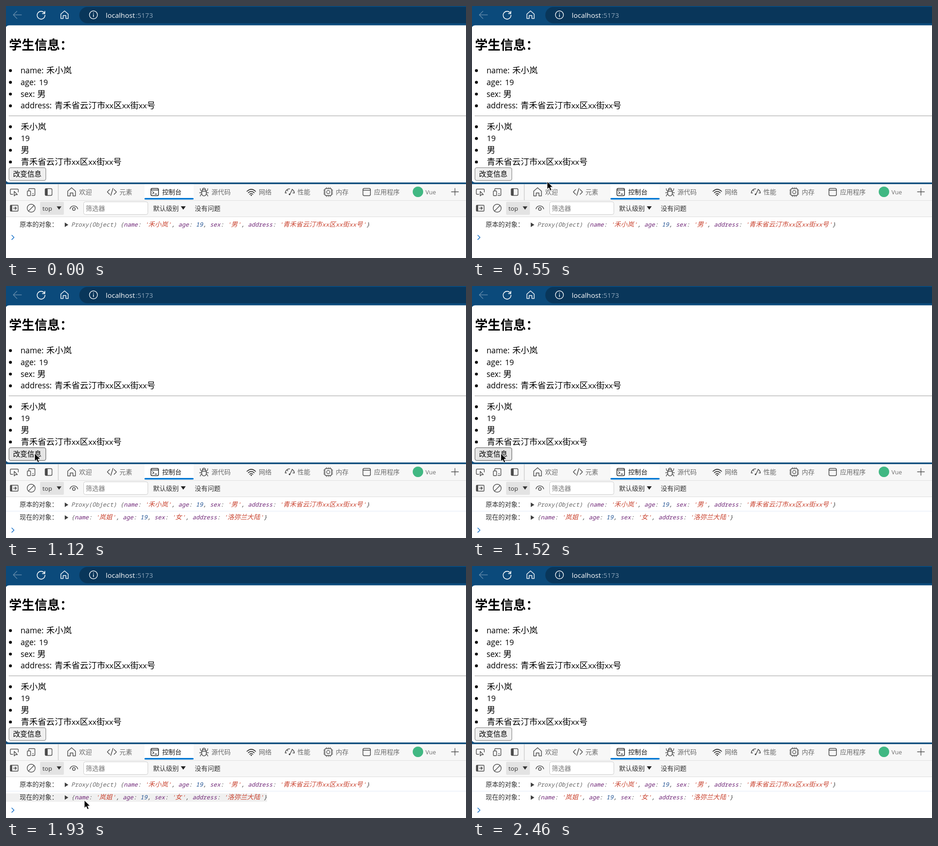
Recreate the animation shown at these times as an HTML page. Size 1010 px wide and 554 px high, loop 2.49 s.

```html
<!DOCTYPE html>
<html lang="zh-CN">
<head>
<meta charset="utf-8">
<title>学生信息</title>
<style>
html, body { margin: 0; width: 100%; height: 100%; overflow: hidden; background: #fff; }
svg { display: block; width: 100%; height: 100%; }
text { white-space: pre; font-family: "Open Sans", "Noto Sans CJK SC", "Noto Sans CJK", sans-serif; }
.mono { font-family: "Noto Sans Mono", "Noto Sans CJK SC", "Noto Sans CJK", monospace; font-style: italic; }
.wide { font-weight: 350; }
.bold, .bold .wide { font-weight: 700; }
</style>
</head>
<body>
<svg id="stage" viewBox="0 0 1010 554"></svg>
<script>
const LOOP = 2490;
const stage = document.getElementById('stage');
const person = ['禾小岚', '19', '男', '青禾省云汀市xx区xx街xx号'];
const changed = ['岚姐', '19', '女', '洛弥兰大陆'];
const keys = ['name', 'age', 'sex', 'address'];

function add(tag, attrs, parent = stage) {
  const el = document.createElementNS('http://www.w3.org/2000/svg', tag);
  for (const k in attrs) el.setAttribute(k, attrs[k]);
  return parent.appendChild(el);
}
const group = () => add('g', {});
const rect = (x, y, width, height, fill, more = {}, parent) =>
  add('rect', { x, y, width, height, fill, ...more }, parent);
const circle = (cx, cy, r, fill, more = {}) => add('circle', { cx, cy, r, fill, ...more });
const shape = (d, fill, parent) => add('path', { d, fill }, parent);
const line = (d, stroke, width = 1.4, parent) => add('path', {
  d, stroke, fill: 'none', 'stroke-width': width, 'stroke-linecap': 'round', 'stroke-linejoin': 'round'
}, parent);

// Latin runs are set a little smaller than the Chinese ones.
function addRuns(el, str, size, latin, fill) {
  for (const run of str.match(/[\u2e80-\uffef]+|[^\u2e80-\uffef]+/g)) {
    const wide = run.charCodeAt(0) >= 0x2e80;
    const span = add('tspan', { 'font-size': wide ? size : latin, fill }, el);
    if (wide) span.setAttribute('class', 'wide');
    span.textContent = run;
  }
}
function text(x, y, str, size, fill, more = {}, parent = stage) {
  addRuns(add('text', { x, y, ...more }, parent), str, size, size * 0.925, fill);
}

function drawBrowser() {
  rect(0, 0, 1010, 392, '#0b4a7b');
  rect(161, 2, 880, 36, '#09365a', { rx: 18 });
  line('M34 19.5H16M24 11.5L16 19.5L24 27.5', '#6088a8', 1.5);
  line('M84.5 16A8.6 8.6 0 1 0 85.6 20M85.3 11.5V16.6H80', '#fff', 1.6);
  line('M120.5 17.8L128.5 10.8L136.5 17.8V27.5H131.5V21H125.5V27.5H120.5Z', '#fff', 1.5);
  circle(192, 19.5, 8.8, 'none', { stroke: '#fff', 'stroke-width': 1.4 });
  line('M192 18.7V23.7', '#fff', 1.5);
  circle(192, 15.5, 1, '#fff');
  text(219, 25.5, 'localhost', 16.6, '#fff');
  text(284.5, 25.5, ':5173', 16.2, '#8ba3b8');
  rect(-1, 42.5, 1030, 345.5, '#fff', { rx: 8 });
}

function drawPage() {
  text(6.5, 96, '学生信息：', 28, '#000', { class: 'bold' });
  const valueX = [88.5, 72.5, 68.5, 106.5];
  person.forEach((value, i) => {
    const top = 148 + i * 25.8, low = 271.5 + i * 25.8;
    for (const y of [top, low]) circle(9.7, y - 6, 3.2, '#000');
    text(32, top, keys[i] + ':', 18.7, '#000');
    text(valueX[i], top, value, 18.6, '#000');
    text(32.5, low, value, 18.6, '#000');
  });
  rect(6, 241, 1004, 1, '#999');
  const button = rect(6.5, 355.5, 81, 28, '#efefef', { rx: 3.5, stroke: '#767676' });
  text(15.5, 375, '改变信息', 15.6, '#000');
  return button;
}

function drawTabs() {
  const ink = '#4a4a4a', dim = '#6c6c6c';
  rect(0, 391.5, 1010, 72.5, '#f7f7f7');
  rect(0, 427, 1010, 1, '#dedede');
  rect(0, 463, 1010, 1, '#dcdcdc');
  rect(114, 392, 1.3, 35, '#c8c8c8');
  rect(304, 392, 108, 33, '#fff');
  rect(304, 422, 108, 3.6, '#0078d4', { rx: 1.8 });

  // inspect, device and dock
  line('M15 414H11Q9.5 414 9.5 412.5V404Q9.5 402.5 11 402.5H25.5Q27 402.5 27 404V409', ink);
  line('M18 407.5V417.5L20.8 414.8H25Z', ink);
  line('M50 406V403Q50 401.5 51.5 401.5H62Q63.5 401.5 63.5 403V415Q63.5 416.5 62 416.5H57M58.5 412.5H60', ink);
  rect(46.8, 406.5, 7.2, 10.5, '#f7f7f7', { rx: 1.5, stroke: ink, 'stroke-width': 1.4 });
  rect(86, 401.5, 15, 15, 'none', { rx: 2.5, stroke: ink, 'stroke-width': 1.4 });
  rect(86, 401.5, 5.5, 15, ink, { rx: 1.5 });

  line('M135.5 407L144 399.5L152.5 407V417.5H147V411H141V417.5H135.5Z', ink, 1.5);
  line('M227.5 403.5L222.5 408.8L227.5 414M237.5 403.5L242.5 408.8L237.5 414M235 401L230 416.5', ink, 1.5);
  rect(318.3, 401, 16.5, 16, 'none', { rx: 2.5, stroke: '#222', 'stroke-width': 1.5 });
  line('M318.5 404.5H334.5M321.8 408L324.8 410.5L321.8 413M327 413.5H331', '#222', 1.3);

  // bug
  rect(429.7, 403.5, 10, 14, 'none', { rx: 5, stroke: ink, 'stroke-width': 1.5 });
  line('M431 405Q431 400.5 434.7 400.5T438.4 405M430 407.5H439.5M429.5 410.5H425M440 410.5H444.5M430 407Q426.5 406.5 426.5 401.5M439.5 407Q443 406.5 443 401.5M430 414Q426.5 414.5 426.5 418M439.5 414Q443 414.5 443 418', ink, 1.3);
  // wifi
  line('M529 407.5Q538.5 398.5 548 407.5M532 410.7Q538.5 404.5 545 410.7M535 413.8Q538.5 410.5 542 413.8', '#333', 1.7);
  circle(538.5, 416, 1.5, '#333');
  // gauge
  line('M613 411Q614.5 402 623 402M628 403Q632.5 405.5 633.3 411M613 411H616M617 404L618.8 406.5M623 415L628.5 403M630 411H633.3', ink, 1.5);
  circle(622.5, 414, 1.8, ink);
  // chip
  rect(700, 401.5, 15, 15, 'none', { rx: 2.5, stroke: ink, 'stroke-width': 1.4 });
  circle(707.5, 409, 3.6, 'none', { stroke: ink, 'stroke-width': 1.3 });
  for (const d of [-4, 0, 4]) {
    line(`M${707.5 + d} 399V401M${707.5 + d} 417V419M697.5 ${409 + d}H699.5M715.5 ${409 + d}H717.5`, ink, 1.3);
  }
  rect(783.7, 401, 16.5, 16, 'none', { rx: 3, stroke: ink, 'stroke-width': 1.5 });
  line('M784 405H800', ink, 1.5);
  circle(904.5, 408.5, 11.5, '#41b883');
  line('M978 408.5H993.5M985.7 400.8V416.2', ink, 1.3);

  const tabs = [[160.5, '欢迎'], [249, '元素'], [451, '源代码'], [555, '网络'], [640, '性能'],
    [724, '内存'], [808, '应用程序'], [921, 'Vue']];
  for (const [x, label] of tabs) text(x, 414, label, 14.1, dim);
  text(343, 414, '控制台', 14.1, '#1b1b1b');
}

function drawToolbar() {
  const ink = '#4a4a4a';
  rect(9.5, 438, 17, 13, 'none', { rx: 1.5, stroke: ink, 'stroke-width': 1.5 });
  rect(9.5, 438, 4, 13, ink);
  line('M16.5 444.5H22M20 441.7L22.8 444.5L20 447.3', ink, 1.6);
  circle(55.3, 444.5, 8.8, 'none', { stroke: ink, 'stroke-width': 1.4 });
  line('M49.3 450.7L61.5 438.5', ink);
  rect(75, 430.5, 52, 28.5, '#e3e3e3', { rx: 2 });
  text(80, 450, 'top', 14.6, '#333');
  shape('M111.3 440.5H121.7L116.5 447.8Z', '#333');
  const eyeBack = rect(133, 430.5, 32, 28.5, '#e9e9e9', { rx: 2 });
  line('M140.5 446Q142.5 439.5 149 439.5T157.5 446', ink, 1.5);
  circle(149, 446.3, 3, 'none', { stroke: ink, 'stroke-width': 1.5 });
  rect(170.5, 430.5, 141, 28, '#fff', { rx: 4, stroke: '#cacaca' });
  text(175, 450, '筛选器', 14.1, '#757575');
  text(323, 450, '默认级别', 14.1, '#333');
  shape('M383.8 440.3H394.6L389.2 447.8Z', '#222');
  text(414.5, 450, '没有问题', 14.1, '#333');
  return eyeBack;
}

function drawRow(y, label, type, values) {
  const g = group();
  const back = rect(0, y - 13, 0, 18.5, '#f0f0f0', {}, g);
  text(30, y, label, 14, '#303030', {}, g);
  shape(`M129 ${y - 9}L136.8 ${y - 4}L129 ${y + 1}Z`, '#404040', g);
  const el = add('text', { x: 143, y, class: 'mono' }, g);
  const put = (str, fill) => addRuns(el, str, 14.3, 12.83, fill);
  put(type + '{', '#666');
  values.forEach((value, i) => {
    if (i) put(', ', '#444');
    put(keys[i], '#702878');
    put(': ', '#555');
    if (i === 1) put(value, '#1d4f91');
    else put(`'${value}'`, '#c9432f');
  });
  put('}', '#444');
  // the highlight ends with the text
  const right = 143 + el.getComputedTextLength();
  back.setAttribute('width', right);
  return { g, back, y, right };
}

drawBrowser();
const button = drawPage();
drawTabs();
const eyeBack = drawToolbar();
rect(0, 464, 1010, 90, '#fff');
const rows = [
  drawRow(485, '原本的对象：', 'Proxy(Object) ', person),
  drawRow(513, '现在的对象：', '', changed)
];
rect(0, 494.5, 1010, 1, '#dfe9f8', {}, rows[1].g);
const prompt = line('M12.8 504L17.6 508.7L12.8 513.4', '#1a73c9', 1.6);
const cursor = add('path', {
  d: 'M0 0V17.3L4 13.6L6.8 20L9.9 18.7L7.1 12.4H12.6Z',
  fill: '#000', stroke: '#fff', 'stroke-width': 1
});

// time, x, y of the pointer tip
const path = [
  [170, 560, 553], [290, 433, 457], [420, 295, 412], [550, 166, 386], [620, 95, 373], [670, 65, 369],
  [730, 65, 369], [760, 63, 368], [1520, 63, 368], [1590, 95, 390], [1680, 149, 441], [1780, 168, 485],
  [1930, 172, 515], [2140, 172, 515], [2200, 205, 520], [2300, 360, 530], [2400, 560, 546], [2460, 638, 553]
];
function pointer(t) {
  const i = path.findIndex(p => p[0] > t);
  if (i === 0) return [-99, -99];
  if (i < 0) return path[path.length - 1].slice(1);
  const a = path[i - 1], b = path[i], k = (t - a[0]) / (b[0] - a[0]);
  return [a[1] + (b[1] - a[1]) * k, a[2] + (b[2] - a[2]) * k];
}
const show = (el, on) => el.setAttribute('visibility', on ? 'inherit' : 'hidden');

function render(t) {
  const [x, y] = pointer(t);
  const inside = (x0, y0, x1, y1) => x >= x0 && x <= x1 && y >= y0 && y <= y1;
  const logged = t >= 1090, pressed = t >= 1030 && t < 1090;
  const over = inside(6, 355, 88, 384);
  cursor.setAttribute('transform', `translate(${x} ${y})`);
  button.setAttribute('fill', pressed ? '#f5f5f5' : over ? '#e5e5e5' : '#efefef');
  button.setAttribute('stroke', pressed ? '#8d8d8d' : over ? '#4f4f4f' : '#767676');
  show(eyeBack, inside(133, 430, 165, 459));
  show(rows[1].g, logged);
  for (const row of rows) show(row.back, inside(0, row.y - 13, row.right, row.y + 5.5));
  prompt.setAttribute('transform', `translate(0 ${logged ? 28 : 0})`);
}
function tick() {
  render(performance.now() % LOOP);
  requestAnimationFrame(tick);
}
tick();
</script>
</body>
</html>
```
